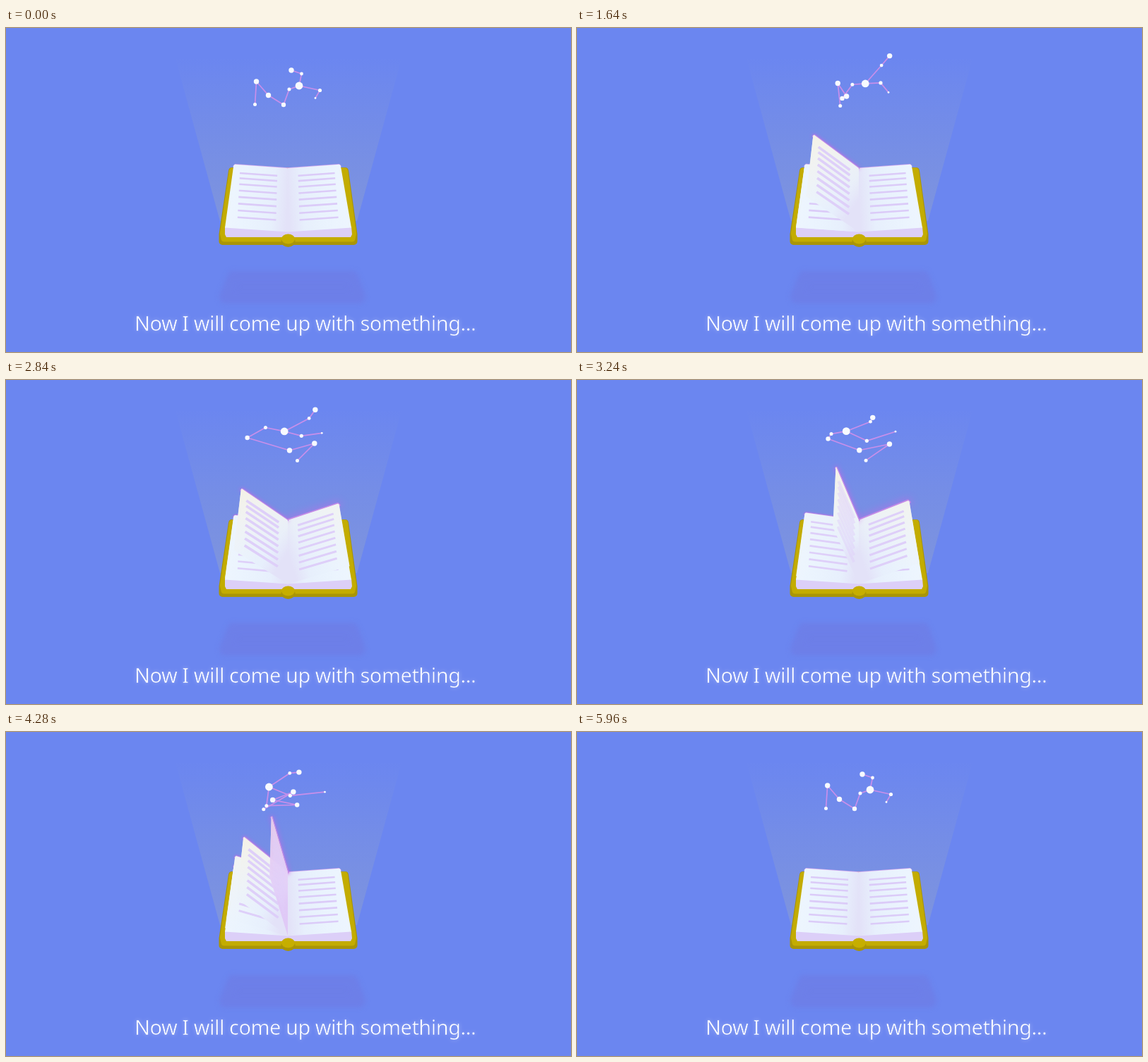
Write an HTML page with a canvas that moves like this. It is 800x460 px and loops after 6 s.

```html
<!DOCTYPE html>
<html lang="en">
<head>
<meta charset="utf-8">
<title>Storybook</title>
<style>
html, body { margin: 0; width: 100%; height: 100%; overflow: hidden; background: #6b86f0; }
canvas { position: absolute; left: 0; top: 0; }
p {
  position: absolute; left: 182px; top: 399px; margin: 0; color: #fff;
  font: 300 29px/40px "Noto Sans", "Open Sans", sans-serif; white-space: pre;
  letter-spacing: -.5px; -webkit-text-stroke: .55px #6b86f0;
  text-shadow: 0 0 6px rgba(255, 255, 255, .3);
}
</style>
</head>
<body>
<canvas id="stage" width="800" height="460"></canvas>
<p>Now I will come up with something...</p>
<script>
const LOOP = 6000, STEP = 40;
const ctx = document.getElementById("stage").getContext("2d");

// Each star swings away from home and back on one or more shared pulses.
const PULSES = {
  early: [2200, 850],
  mid: [2860, 1180],
  slow: [3280, 1300],
  late: [3900, 600]
};
const STARS = [
  { r: 2.5, home: [352.5, 108.5], mid: [60, 6] },
  { r: 3.7, home: [354.5, 76], slow: [88, 15] },
  { r: 3.7, home: [371.5, 95.5], mid: [30, 4.5] },
  { r: 3.2, home: [393, 109], mid: [-52, -27], late: [41, 0] },
  { r: 2.5, home: [401, 87], mid: [-33, -20], late: [-35, 30] },
  { r: 5.4, home: [415, 82], mid: [-20, -9], late: [-53, -3] },
  { r: 2.4, home: [418.5, 65], early: [18, -17], late: [-23, -9] },
  { r: 3.7, home: [404, 60], early: [55, -29], late: [15, -4] },
  { r: 2.6, home: [444.5, 88.5], early: [-12, -15], mid: [-18, 0], late: [-53, 2.5] },
  { r: 1.4, home: [438, 99.5], mid: [9, -24], late: [16, -13] }
];
// Every star hangs on the one before it, except where a branch begins.
const parent = i => i === 8 ? 5 : i - 1;

const LEAF_STARTS = [300, 980, 1640, 2160, 2800, 3190, 3400, 3640, 3880];
const LEAF_TIME = 1450, LEAF_EASE = 2.8;

const pulse = (t, [center, width]) => Math.exp(-(Math.abs((t - center) / width) ** 2.5));
const mix = (a, b, u) => [a[0] + (b[0] - a[0]) * u, a[1] + (b[1] - a[1]) * u];

function path(points) {
  ctx.beginPath();
  points.forEach(p => ctx.lineTo(p[0], p[1]));
}

function shape(points, fill) {
  path(points);
  ctx.closePath();
  ctx.fillStyle = fill;
  ctx.fill();
}

function soft(points, color, round) {
  shape(points, color);
  ctx.strokeStyle = color;
  ctx.lineWidth = round * 2;
  ctx.lineJoin = "round";
  ctx.stroke();
}

function gradient(a, b, ...stops) {
  const g = ctx.createLinearGradient(a[0], a[1], b[0], b[1]);
  stops.forEach((c, i) => g.addColorStop(i / (stops.length - 1), c));
  return g;
}

function oval(x, y, rx, ry, color) {
  ctx.beginPath();
  ctx.ellipse(x, y, rx, ry, 0, 0, Math.PI * 2);
  ctx.fillStyle = color;
  ctx.fill();
}

function drawScene() {
  ctx.fillStyle = "#6b86f0";
  ctx.fillRect(0, 0, 800, 460);
  shape([[239, 40], [561, 40], [497, 274], [303, 274]],
    gradient([0, 40], [0, 274], "rgba(190,195,160,0)", "rgba(190,195,160,.12)", "rgba(190,195,160,.23)"));
  ctx.save();
  ctx.filter = "blur(3px)";
  soft([[322, 354], [490, 354], [500, 382], [311, 382]], "#6d7fe8", 9);
  ctx.restore();
}

function drawCover() {
  soft([[320, 203], [480, 203], [492.5, 293], [492.5, 303], [306.5, 303], [306.5, 293]], "#a99507", 5);
  soft([[320.5, 203], [479.5, 203], [491.5, 292], [490, 299], [309, 299], [307.5, 292]], "#c3ac00", 4.5);
  oval(399.5, 302.5, 10, 8.5, "#a99507");
  shape([[310, 282], [399, 288], [489, 282], [490, 293], [488, 297], [312, 297], [310, 293]], "#dccff8");
  oval(399.5, 299.5, 9.5, 7, "#c6ae00");
}

// Angle 0 lies right, 180 lies left; glow follows the turning speed.
function drawLeaf(angle, glow = 0) {
  const a = angle * Math.PI / 180, c = Math.cos(a), s = Math.sin(a);
  const top = [399, 199], low = [399, 289.5];
  const tip = [398 + 75.5 * c, 193.5 - 78 * s];
  const foot = [399.5 + 89.5 * c, 283.5 - 82 * s];
  const at = (u, v) => mix(mix(top, tip, u), mix(low, foot, u), v);
  const flat = s < .01;
  const rim = at(.975, 0), side = at(1, .03);

  ctx.save();
  ctx.lineJoin = ctx.lineCap = "round";
  ctx.globalAlpha = Math.min(1, .3 + 2 * Math.abs(c));
  if (!flat) {
    ctx.shadowColor = "#cf63e8";
    ctx.shadowBlur = 2 + 10 * glow;
  }
  path([top, rim, side]);
  ctx.strokeStyle = flat ? "#d5a8ee" : "#c38be6";
  ctx.lineWidth = 1.5 + 3 * glow * Math.min(1, 3 * s);
  ctx.stroke();
  ctx.shadowBlur = 0;

  path([top, rim]);
  ctx.quadraticCurveTo(tip[0], tip[1], side[0], side[1]);
  ctx.lineTo(foot[0], foot[1]);
  ctx.lineTo(low[0], low[1]);
  ctx.closePath();
  ctx.fillStyle = gradient(at(0, .5), at(1, .5), "#e3e2f8", "#e7effc", "#e9f2fd", "#ebf4fe", "#edf5fe");
  ctx.fill();
  if (!flat) {
    ctx.fillStyle = gradient(tip, at(.35, .8), `rgba(246,241,226,${Math.min(.85, s * 2)})`, "rgba(240,240,240,0)");
    ctx.fill();
  }
  if (Math.abs(c) < .3) {
    ctx.fillStyle = gradient(tip, top, "rgba(207,120,232,.35)", "rgba(220,170,245,.5)");
    ctx.fill();
  }

  ctx.lineCap = "butt";
  ctx.strokeStyle = flat ? "#dbcbf8" : "#decff9";
  ctx.lineWidth = 2.6 + Math.min(1, s * 2);
  ctx.globalAlpha *= Math.min(1, Math.abs(c) * 1.2);
  for (let i = 0; i < 8; i++) {
    const v = .13 + .695 * (i / 7) ** 1.1;
    path([at(.19, v), at(.87 - .05 * i / 7, v)]);
    ctx.stroke();
  }
  ctx.restore();
}

function drawBook(t) {
  drawCover();
  drawLeaf(180);
  drawLeaf(0);
  LEAF_STARTS.map(start => 1 - (t - start) / LEAF_TIME)
    .filter(left => left > 0 && left < 1)
    .map(left => ({ angle: 180 * (1 - left ** LEAF_EASE), glow: left ** (LEAF_EASE - 1) }))
    .sort((a, b) => Math.abs(b.angle - 90) - Math.abs(a.angle - 90))
    .forEach(leaf => drawLeaf(leaf.angle, leaf.glow));
}

function starPlace(star, t) {
  let [x, y] = star.home;
  for (const name in PULSES) {
    if (!star[name]) continue;
    const amount = pulse(t, PULSES[name]);
    x += star[name][0] * amount;
    y += star[name][1] * amount;
  }
  return [x, y];
}

function drawStars(t) {
  const places = STARS.map(star => starPlace(star, t));
  ctx.strokeStyle = "#c98fea";
  ctx.lineWidth = 1.7;
  for (let i = 1; i < places.length; i++) {
    path([places[parent(i)], places[i]]);
    ctx.stroke();
  }
  places.forEach(([x, y], i) => oval(x, y, STARS[i].r, STARS[i].r, "#f7fafe"));
}

const start = performance.now();
function frame() {
  const elapsed = (performance.now() - start) % LOOP;
  const t = Math.floor(elapsed / STEP) * STEP;
  drawScene();
  drawBook(t);
  drawStars(t);
  requestAnimationFrame(frame);
}
frame();
</script>
</body>
</html>
```
